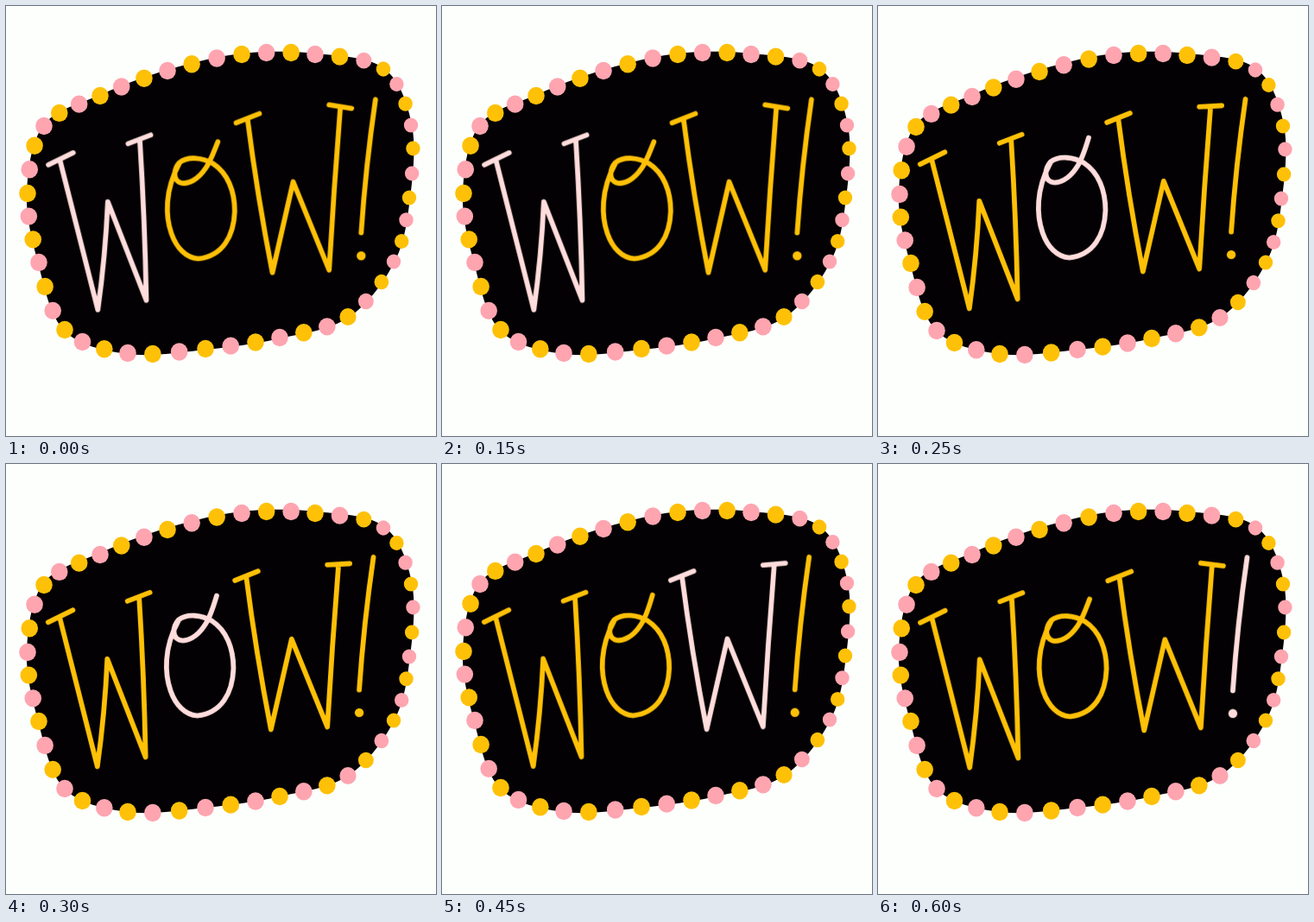
Write an HTML page that moves like this. It is 498 px wide and 498 px high and loops after 650 ms.

```html
<!DOCTYPE html>
<html lang="en">
<head>
<meta charset="utf-8">
<title>WOW!</title>
<style>
  html, body { margin: 0; width: 100%; height: 100%; overflow: hidden; background: #fdfffd; }
  svg { display: block; width: 498px; height: 498px; }
  .ink { fill: none; stroke-width: 5.8; stroke-linecap: round; stroke-linejoin: round; }
</style>
</head>
<body>
<svg id="stage" viewBox="0 0 498 498"></svg>
<script>
const LOOP = 650;
const STARTS = [0, 200, 350, 500];
const BULBS = 48;
const GOLD = '#fec107', PINK = '#fea5b0', PALE = '#ffdddc', BLACK = '#030104';
const stage = document.getElementById('stage');

// Key points of the sign's rim, clockwise from the top
const RIM = [
  [273, 56], [358, 56], [437, 73], [469, 138], [467, 222], [449, 296], [396, 360], [317, 384],
  [231, 397], [141, 402], [68, 375], [38, 297], [25, 217], [44, 139], [109, 104], [187, 75]
];

function add(parent, tag, attrs = {}) {
  const el = document.createElementNS('http://www.w3.org/2000/svg', tag);
  for (const key in attrs) el.setAttribute(key, attrs[key]);
  parent.appendChild(el);
  return el;
}

// Point on the closed Catmull-Rom rim, u from 0 to 1
function rimAt(u) {
  const n = RIM.length, i = Math.floor(u * n), t = u * n - i;
  const [a, b, c, d] = [-1, 0, 1, 2].map(k => RIM[(i + k + n) % n]);
  return [0, 1].map(k => b[k] + t / 2 * (c[k] - a[k] +
    t * (2 * a[k] - 5 * b[k] + 4 * c[k] - d[k] + t * (3 * (b[k] - c[k]) + d[k] - a[k]))));
}

function drawSign() {
  const steps = BULBS * 4;
  const points = Array.from({ length: steps }, (_, i) => rimAt(i / steps));
  add(stage, 'polygon', { points: points.join(' '), fill: BLACK, stroke: BLACK, 'stroke-width': 2 });
}

// Bulbs swap colours and drop a little in the second set; they shrink towards the right
function drawBulbs(group, set) {
  for (let i = 0; i < BULBS; i++) {
    const [cx, y] = rimAt(i / BULBS);
    const r = 9.8 - 1.6 * Math.min(1, Math.max(0, (cx - 390) / 50));
    add(group, 'ellipse', {
      cx, cy: y + set, rx: r, ry: r * 1.04, fill: i % 2 === set ? GOLD : PINK
    });
  }
}

const line = (x1, y1, x2, y2) => `M${x1} ${y1}L${x2} ${y2}`;

// Polyline whose strokes bow sideways by the given bends
function strokes(pts, bends) {
  return 'M' + pts[0] + bends.map((bend, i) => {
    const [[x1, y1], [x2, y2]] = [pts[i], pts[i + 1]];
    return `Q${(x1 + x2) / 2 + bend} ${(y1 + y2) / 2} ${x2} ${y2}`;
  }).join('');
}

// Letter shapes; sway from -1 to 1 tilts serifs and lifts tails
function letters(sway) {
  const tail = 154.5 + 3 * sway, tilt = 0.5 + 2 * sway;
  return [
    line(49, 183.5, 77.5, 169.5) + line(141, 159, 167, 149) +
      strokes([[62, 177], [106, 351], [117.5, 226], [162, 340], [154.5, 155]], [0, 3, 0, 2]),
    `M244.5 ${tail}C240 168 236 180 230 188C222 200 210 207 201 204C192 200 194 188 200 181` +
      'C210 173 227 175 239 182C256 193 264 214 264 237C263 266 250 289 222 292' +
      'C208 291 197 280 191 263C184 243 183 213 200 182',
    line(265.7, 135, 292.5, 124.3) + line(373, 116.2 - tilt, 399, 116.2 + tilt) +
      strokes([[278.8, 130.5], [307.5, 308], [331.5, 203], [373, 305], [386, 116.5]], [-3, 0, 0, -1]),
    strokes([[426.5, 108], [410, 262]], [-3])
  ];
}

function drawLetters(group, pose) {
  const sway = Math.cos((pose + 0.4) * Math.PI / 2);
  const ink = i => i === pose ? PALE : GOLD;
  group.setAttribute('transform', `scale(${1 + 0.004 * sway} ${1 + 0.003 * sway})`);
  letters(sway).forEach((d, i) => add(group, 'path', { d, class: 'ink', stroke: ink(i) }));
  add(group, 'circle', { cx: 410, cy: 288.5, r: 5.2, fill: ink(3) });
}

function showDuring(el, visible) {
  const frames = STARTS.map((start, i) => ({
    offset: start / LOOP, opacity: visible(i) ? 1 : 0, easing: 'step-end'
  }));
  frames.push({ ...frames[frames.length - 1], offset: 1 });
  el.animate(frames, { duration: LOOP, iterations: Infinity });
}

drawSign();

for (const set of [0, 1]) {
  const group = add(stage, 'g');
  drawBulbs(group, set);
  showDuring(group, i => i % 2 === set);
}

STARTS.forEach((_, pose) => {
  const group = add(stage, 'g');
  drawLetters(group, pose);
  showDuring(group, i => i === pose);
});
</script>
</body>
</html>
```
